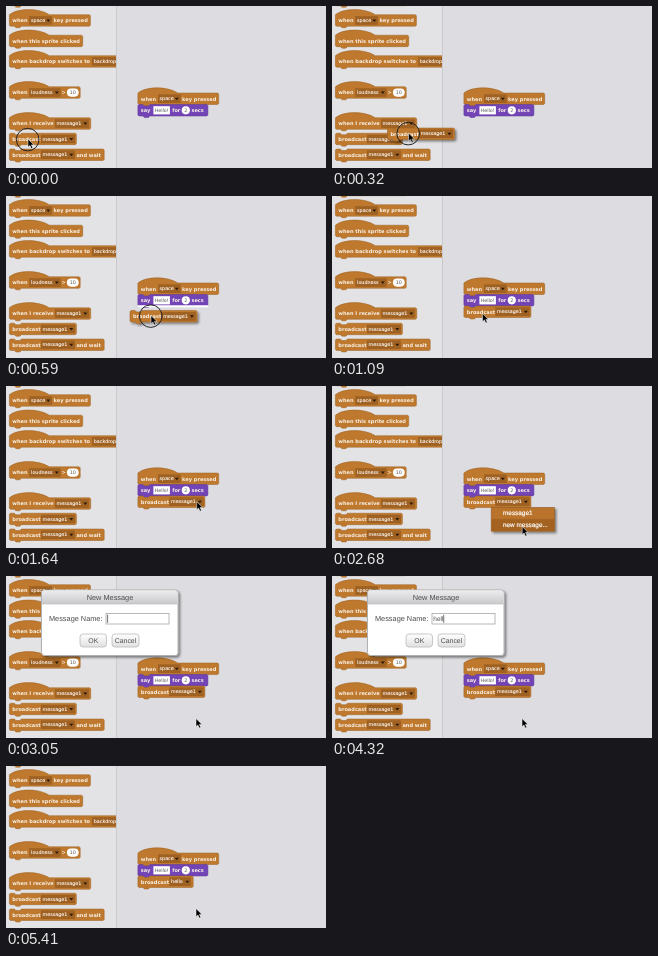
Recreate the animation shown at these times as an HTML page. Size 320 by 162 pixels, loop 5.46 s.

```html
<!DOCTYPE html>
<html lang="en">
<head>
<meta charset="utf-8">
<title>Broadcast block</title>
<style>
html, body { margin: 0; width: 100%; height: 100%; overflow: hidden; background: #dddce0; }
svg { display: block; width: 320px; height: 162px; }
text { text-rendering: geometricPrecision; white-space: pre; }
.label { font: bold 5.05px "DejaVu Sans", sans-serif; fill: #f8efe5; }
.field { font: 4.8px "DejaVu Sans", sans-serif; fill: #fff; stroke: #fff; stroke-width: .1; }
.input { font: 4.8px "DejaVu Sans", sans-serif; fill: #555; }
.item { font: 6.4px "Liberation Sans", Arial, sans-serif; fill: #fff; stroke: #fff; stroke-width: .2; }
.dialog { font: 7.35px "Liberation Sans", Arial, sans-serif; fill: #4c4d4f; }
.button { font-size: 6.9px; text-anchor: middle; }
.title { text-anchor: middle; }
.typed { font-size: 6.5px; }
</style>
</head>
<body>
<svg viewBox="0 0 320 162">
  <defs>
    <linearGradient id="bar" x2="0" y2="1"><stop stop-color="#ececed"/><stop offset="1" stop-color="#c9cacc"/></linearGradient>
    <linearGradient id="btn" x2="0" y2="1"><stop stop-color="#fff"/><stop offset="1" stop-color="#e0e0e1"/></linearGradient>
    <filter id="shadow" x="-20%" y="-30%" width="150%" height="180%">
      <feDropShadow dx="1.7" dy="1.7" stdDeviation="1" flood-opacity=".45"/>
    </filter>
    <clipPath id="pane"><path d="M0 0H110V162H0z"/></clipPath>
  </defs>
  <path d="M0 0H110V162H0z" fill="#e3e3e5"/>
  <path d="M110.5 0V162" stroke="#cbcbce"/>
  <g id="palette" clip-path="url(#pane)"></g>
  <g id="script"></g>
  <path id="slot" d="M132 110.2H202" stroke="#fff" stroke-width="2"/>
  <g id="oldMsg"></g>
  <g id="newMsg"></g>
  <g id="drag" filter="url(#shadow)"></g>
  <g id="menu">
    <path d="M159.3 121.5H222.5V145.2H159.3z" fill="#b9732a" stroke="#94591f" stroke-width=".6" filter="url(#shadow)"/>
    <path id="hover" d="M159.6 133.4H222.2V145H159.6z" fill="#a36220"/>
    <path d="M159.6 133.3H222.2" stroke="#9a5f22" stroke-width=".6"/>
    <text class="item" x="171" y="129.3">message1</text>
    <text class="item" x="171" y="141">new message...</text>
  </g>
  <g id="dialog" class="dialog">
    <rect x="35.5" y="14" width="136.5" height="65.5" rx="3" fill="#fff" stroke="#b0b1b3" filter="url(#shadow)"/>
    <path d="M36 28V17q0-2.5 2.5-2.5H169q2.5 0 2.5 2.5V28z" fill="url(#bar)"/>
    <path d="M36 28H171.5" stroke="#b5b6b8" stroke-width=".6"/>
    <text class="title" x="104" y="23.5">New Message</text>
    <text x="43" y="45">Message Name:</text>
    <rect x="100" y="37.5" width="63" height="10.5" fill="#fff" stroke="#a5a6a8" stroke-width=".8"/>
    <text id="typed" class="typed" x="101.3" y="45"></text>
    <path id="caret" d="M0 38.8V46.8" stroke="#333" stroke-width=".7"/>
    <g fill="url(#btn)" stroke="#b9babc" stroke-width=".8">
      <rect x="74" y="58" width="26.5" height="13" rx="3"/>
      <rect x="106" y="58" width="27" height="13" rx="3"/>
    </g>
    <text class="button" x="87.3" y="67">OK</text>
    <text class="button" x="119.5" y="67">Cancel</text>
  </g>
  <g id="pointer">
    <circle id="ring" cx="-.3" cy=".6" r="11.3" fill="none" stroke="#222" stroke-width="1"/>
    <path d="M0 0V8.2L1.9 6.5 3.3 9.6 4.8 8.9 3.4 5.9H6z" fill="#000" stroke="#fff" stroke-width=".5"/>
  </g>
</svg>
<script>
const LOOP = 5460, H = 11.5;
const LEFT = 3.4, SCRIPT = 131.9;
const ORANGE = ['#be792e', '#9a6022'], PURPLE = ['#7344b5', '#5a3595'];
const $ = id => document.getElementById(id);

// Parts of a block; x is measured from its left edge.
const text = (x, s) => `<text class="label" x="${x}" y="7.6">${s}</text>`;
const field = (x, s, w) =>
  `<rect x="${x}" y="1.8" width="${w}" height="8" fill="#a06223" stroke="#935a1e" stroke-width=".4"/>` +
  `<text class="field" x="${x + 1.4}" y="7.4">${s}</text>` +
  `<path d="M${x + w - 5.4} 4.7h4l-2 2.6z" fill="#2c1a08"/>`;
const input = (x, s, w, r = 0) =>
  `<rect x="${x}" y="1.7" width="${w}" height="8.2" rx="${r}" fill="#fff"/>` +
  `<text class="input" text-anchor="middle" x="${x + w / 2}" y="7.5">${s}</text>`;

function block(x, y, w, parts, hat, [fill, edge] = ORANGE) {
  const top = hat ? 'M0 0C7 -6.2 28 -7.6 40 0' : 'M0 1L1 0H5l1.5 1.5h4L12 0';
  const d = `${top}H${w - 1}l1 1V${H - 1}l-1 1H12l-1.5 1.5h-4L5 ${H}H1l-1 -1z`;
  return `<g transform="translate(${x} ${y})"><path d="${d}" fill="${fill}" stroke="${edge}" stroke-width=".5"/>${parts}</g>`;
}

const keyHat = text(2.9, 'when') + field(20.3, 'space', 22) + text(44.2, 'key pressed');
const send = text(2.9, 'broadcast') + field(31.8, 'message1', 33.5);
const sendHello = text(2.9, 'broadcast') + field(31.8, 'hello', 21);

$('palette').innerHTML =
  block(LEFT, -11.8, 71, '', true) +
  block(LEFT, 8.7, 81, keyHat, true) +
  block(LEFT, 29.2, 73.3, text(2.9, 'when this sprite clicked'), true) +
  block(LEFT, 49.7, 130, text(2.9, 'when backdrop switches to') + field(83, 'backdrop1', 38), true) +
  block(LEFT, 80.8, 70.8, text(2.9, 'when') + field(20.3, 'loudness', 30.5) + text(52.2, '&gt;') + input(57.5, '10', 11.8, 4.1), true) +
  block(LEFT, 111.8, 81.3, text(2.9, 'when I receive') + field(45.8, 'message1', 33.5), true) +
  block(LEFT, 127.2, 67, send) +
  block(LEFT, 143, 94.8, send + text(67, 'and wait'));

$('script').innerHTML =
  block(SCRIPT, 87, 80.8, keyHat, true) +
  block(SCRIPT, 98.5, 70, text(2.9, 'say') + input(15.5, 'Hello!', 16.5) + text(34.3, 'for') +
    input(43.8, '2', 8.2, 4.1) + text(53.5, 'secs'), false, PURPLE);
$('oldMsg').innerHTML = block(SCRIPT, 110, 67, send);
$('newMsg').innerHTML = block(SCRIPT, 110, 55.3, sendHello);
$('drag').innerHTML = block(0, 0, 67, send);

// Pointer stops: time, x, y
const path = [
  [0, 22, 133], [90, 22, 133], [590, 145, 119.5], [760, 150.5, 117.5],
  [1230, 150.5, 117.5], [1700, 192.5, 115.5], [2330, 192.5, 115.5], [2750, 190, 142.5], [LOOP, 190, 142.5]
];
const presses = [[0, 760], [1720, 1860], [2800, 3000]];
const keys = [3780, 3940, 4100, 4260, 4430];

function pointerAt(t) {
  const i = path.findIndex(p => p[0] > t);
  const [t0, x0, y0] = path[i - 1], [t1, x1, y1] = path[i];
  const u = (t - t0) / (t1 - t0), k = u * u * (3 - 2 * u);
  return [x0 + (x1 - x0) * k, y0 + (y1 - y0) * k];
}
const show = (id, on) => $(id).style.display = on ? '' : 'none';

function draw(t) {
  const [x, y] = pointerAt(t);
  const dragging = t > 90 && t < 760;
  $('pointer').setAttribute('transform', `translate(${x} ${y})`);
  show('ring', presses.some(([a, b]) => t >= a && t < b));
  $('drag').setAttribute('transform', `translate(${x - 21} ${y - 5})`);
  show('drag', dragging);
  show('slot', dragging && x > 130);
  show('oldMsg', t >= 760 && t < 4850);
  show('newMsg', t >= 4850);
  show('menu', t >= 1860 && t < 3000);
  show('hover', y > 133);
  show('dialog', t >= 3000 && t < 4850);

  const pressed = keys.filter(k => k <= t);
  $('typed').textContent = 'hello'.slice(0, pressed.length);
  const caretX = 101.6 + (pressed.length && t < 4850 ? $('typed').getComputedTextLength() : 0);
  $('caret').setAttribute('transform', `translate(${caretX} 0)`);
  show('caret', (t - (pressed.at(-1) ?? 3000)) % 1000 < 500);
}

const start = performance.now();
function tick() {
  draw((performance.now() - start) % LOOP);
  requestAnimationFrame(tick);
}
tick();
</script>
</body>
</html>
```
